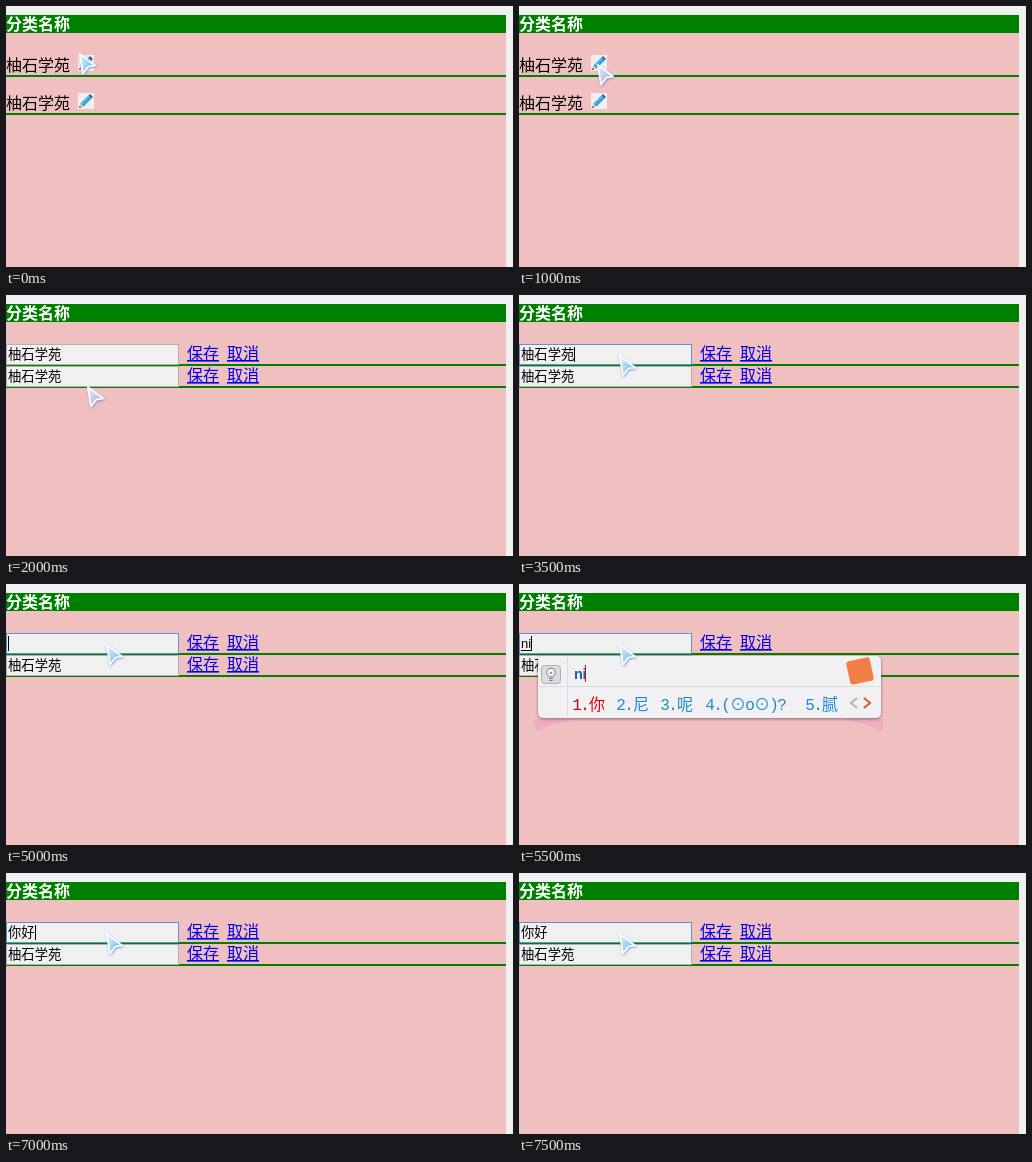
Write an HTML page that moves like this. It is 507x261 px and loops after 8000 ms.

```html
<!DOCTYPE html>
<html lang="zh-CN">
<head>
<meta charset="utf-8">
<title>分类名称</title>
<style>
html, body { margin: 0; width: 100%; height: 100%; overflow: hidden; background: #f0f0f0; }
svg { display: block; width: 507px; height: 261px; }
text { font: 16px "Noto Sans CJK SC", "Noto Sans CJK", sans-serif; white-space: pre; }
.head { font-weight: bold; fill: #fff; }
.link { fill: #00e; text-decoration: underline; }
.field { font-size: 13.33px; }
#typed { font-family: "Liberation Sans", "Noto Sans CJK SC", sans-serif; }
#typed.raw { font-size: 13px; }
.cell { font-family: "Liberation Mono", "Noto Sans CJK SC", "Noto Sans CJK", monospace; fill: #1b8bd3; }
.hint { font-size: 12px; }
.first { fill: #e3000b; }
.pinyin { font: bold 14.5px "Liberation Sans", sans-serif; letter-spacing: -.4px; fill: #1763ac; }
</style>
</head>
<body>
<svg viewBox="0 0 507 261">
  <defs>
    <linearGradient id="cool" x1="0" y1="0" x2="1" y2="1">
      <stop offset="0" stop-color="#e8f8ff"/><stop offset="1" stop-color="#55aee6"/>
    </linearGradient>
    <linearGradient id="violet" x1="0" y1="0" x2="1" y2="1">
      <stop offset="0" stop-color="#f2f3ff"/><stop offset="1" stop-color="#8f9fdd"/>
    </linearGradient>
    <filter id="glow" x="-40%" y="-40%" width="180%" height="180%">
      <feDropShadow dx="0.5" dy="1" stdDeviation="0.9" flood-color="#5078c8" flood-opacity=".75"/>
    </filter>
    <filter id="shade" x="-5%" y="-15%" width="110%" height="135%">
      <feDropShadow dx="0" dy="1" stdDeviation="1.6" flood-color="#604048" flood-opacity=".7"/>
    </filter>
    <g id="pencil">
      <rect width="16" height="16" fill="#f3efef"/>
      <path d="M1 15L2.5 10.5L5.5 13.5Z" fill="#e8c58e"/>
      <path d="M1 15L1.7 12.8L3.2 14.3Z" fill="#345"/>
      <path d="M2.5 10.5L10.5 2.5L13.5 5.5L5.5 13.5Z" fill="#2b9fe0"/>
      <path d="M3.6 11.3L11.4 3.5" stroke="#86d0f5"/>
      <path d="M10.5 2.5L12 1L15 4L13.5 5.5Z" fill="#27689f"/>
    </g>
    <g id="links">
      <text class="link" x="181" y="64">保存</text>
      <text class="link" x="221" y="64">取消</text>
    </g>
    <g id="bulb">
      <rect x="22.5" y="81.5" width="19" height="18" rx="3" fill="#dcdce0" stroke="#aeb0b6"/>
      <circle cx="32" cy="88.5" r="4.3" fill="#f6f6f6" stroke="#777b84"/>
      <path d="M30 94.5h4M30.5 96.5h3M31 88l1 2l1-2" fill="none" stroke="#777b84"/>
    </g>
  </defs>

  <rect y="9" width="500" height="252" fill="#f0c0c0"/>
  <rect y="9" width="500" height="18" fill="#008000"/>
  <text class="head" x="0" y="24">分类名称</text>
  <rect y="69" width="500" height="2" fill="#008000"/>
  <rect id="line" width="500" height="2" fill="#008000"/>

  <g data-on="0-2">
    <text x="0" y="65">柚石学苑</text>
    <use href="#pencil" x="72" y="49"/>
  </g>
  <g data-on="0-3">
    <text x="0" y="103">柚石学苑</text>
    <use href="#pencil" x="72" y="87"/>
  </g>

  <g data-on="3-15">
    <rect id="box" x=".5" y="49.5" width="172" height="20" fill="#f0f0f0"/>
    <text id="typed" class="field" y="64"></text>
    <rect id="under" x="2" y="66" height="1"/>
    <rect id="caret" y="52" width="1" height="15"/>
    <use href="#links"/>
  </g>
  <g data-on="4-15">
    <rect x=".5" y="71.5" width="172" height="20" fill="#f0f0f0" stroke="#b4b0b0"/>
    <text class="field" x="2" y="86">柚石学苑</text>
    <use href="#links" y="22"/>
  </g>

  <g data-on="11-11">
    <path d="M15 135H62Q34 138 19 147Q14 144 15 135ZM322 135H364Q366 143 361 147Q345 138 322 135Z" fill="#f0adc0"/>
    <rect x="19" y="72" width="343" height="62" rx="5" fill="#f1f0f2" filter="url(#shade)"/>
    <path d="M48.5 73V133M20 102.5H361" stroke="#dcd9de"/>
    <use href="#bulb"/>
    <text class="pinyin" x="55" y="95">ni</text>
    <rect x="66" y="81" width="1" height="17" fill="#e3000b"/>
    <rect x="329" y="75" width="24" height="24" rx="3" fill="#f08048" transform="rotate(-12 341 87)"/>
    <g id="short"></g>
    <path d="M338 114L332 119L338 124" fill="none" stroke="#b4b4b4" stroke-width="2"/>
    <path d="M345 114L351 119L345 124" fill="none" stroke="#d9542b" stroke-width="2"/>
  </g>

  <g data-on="12-13">
    <path d="M38 135H84Q54 139 41 147Q36 144 38 135Z" fill="#f0adc0"/>
    <rect x="40" y="72" width="500" height="62" rx="5" fill="#f1f0f2" filter="url(#shade)"/>
    <path d="M69.5 73V133M41 102.5H507" stroke="#dcd9de"/>
    <use href="#bulb" x="21"/>
    <text class="pinyin" x="76" y="95">ni'hoa</text>
    <path d="M101 89A5 5 0 0 1 109 86M111 91A5 5 0 0 1 103 95" fill="none" stroke="#e04848" stroke-width="1.5"/>
    <path d="M107 83L111 87L106 88ZM105 98L101 94L106 93Z" fill="#e04848"/>
    <rect x="116" y="81" width="1" height="18" fill="#e3000b"/>
    <g id="long"></g>
    <circle cx="128.500" cy="116.500" r="4.800" fill="#e3101a"/>
    <path d="M126 116.500L128 118.500L131.500 114.500" fill="none" stroke="#fff" stroke-width="1.400"/>
    <circle cx="381.500" cy="114.500" r="2.500" fill="#2a8fd8"/>
    <path d="M377 122Q377 117 381.500 117T386 122Z" fill="#2a8fd8"/>
  </g>
  <g id="more" data-on="13-13">
    <circle cx="187" cy="90" r="5" fill="#f3e3c4" stroke="#d8b988"/>
    <path d="M187 87v4M187 92v1.500" stroke="#c79b58" stroke-width="1.500"/>
    <path d="M190 94l4 3" stroke="#d8b988" stroke-width="2"/>
  </g>

  <path id="arrow" d="M.8 .8L16 12.500L9.500 13.500L4 20.500Z" stroke="#fff" stroke-width="1.600" stroke-linejoin="round" filter="url(#glow)"/>
</svg>
<script>
const STEP = 500, COUNT = 16;
const $ = id => document.getElementById(id);

// Half-width characters take half a cell, all others a full one.
function cells(parent, str, x, y, size, cls) {
  const el = document.createElementNS("http://www.w3.org/2000/svg", "text");
  const xs = [];
  for (const ch of str) {
    const half = ch < "\u0080";
    xs.push(half ? x - size * .05 : x);
    x += half ? size / 2 : size;
  }
  el.setAttribute("class", "cell " + cls);
  el.setAttribute("x", xs.join(" "));
  el.setAttribute("y", y);
  el.textContent = str;
  parent.append(el);
}

function choices(id, list) {
  list.forEach(([x, str], i) =>
    cells($(id), `${i + 1}.${str}`, x, 126, 16, i ? "" : "first"));
}
choices("short", [[54, "你"], [98, "尼"], [142, "呢"], [187, "(⊙o⊙)?"], [287, "腻"]]);
choices("long", [[75, "你好"], [145, "你好哦啊"], [237, "你红啊"], [313, "聂恒岸"], [398, "字符画：你好"]]);
cells($("more"), "更多人名(分号+R)", 200, 95, 12, "hint");

// first step, text, caret x (0 = hidden), underline width
const typing = [
  [3, "柚石学苑", 0, 0], [7, "柚石学苑", 55, 0], [8, "柚石学", 42, 0], [9, "柚", 15, 0],
  [10, "", 2, 0], [11, "ni", 12, 10], [12, "nihoa", 33, 31], [13, "nihoa", 0, 31],
  [14, "你好", 29, 0], [15, "你好", 0, 0]
];
// first step, tip x, tip y, tint
const moves = [
  [0, 73, 47, "cool"], [1, 75, 57, "violet"], [2, 78, 58, "violet"], [3, 80, 93, "violet"],
  [4, 81, 91, "violet"], [5, 92, 61, "cool"], [6, 94, 61, "cool"], [7, 100, 60, "cool"]
];
const at = (table, n) => table.filter(row => row[0] <= n).pop() || table[0];

const parts = [...document.querySelectorAll("[data-on]")].map(el =>
  [el, ...el.dataset.on.split("-").map(Number)]);

function draw(n) {
  for (const [el, from, to] of parts)
    el.style.display = n >= from && n <= to ? "" : "none";
  $("line").setAttribute("y", n < 4 ? 107 : 91);
  $("box").setAttribute("stroke", n < 7 ? "#b4b0b0" : "#6490d6");

  const [, str, caret, width] = at(typing, n);
  $("typed").textContent = str;
  $("typed").setAttribute("x", 2);
  $("typed").setAttribute("class", width ? "field raw" : "field");
  $("under").setAttribute("width", width);
  $("caret").setAttribute("x", caret);
  $("caret").style.display = caret ? "" : "none";

  const [, x, y, tint] = at(moves, n);
  $("arrow").setAttribute("transform", `translate(${x} ${y})`);
  $("arrow").setAttribute("fill", `url(#${tint})`);
}

let shown = -1;
const start = performance.now();
function tick() {
  const n = Math.floor((performance.now() - start) / STEP) % COUNT;
  if (n !== shown) draw(shown = n);
  requestAnimationFrame(tick);
}
tick();
</script>
</body>
</html>
```
